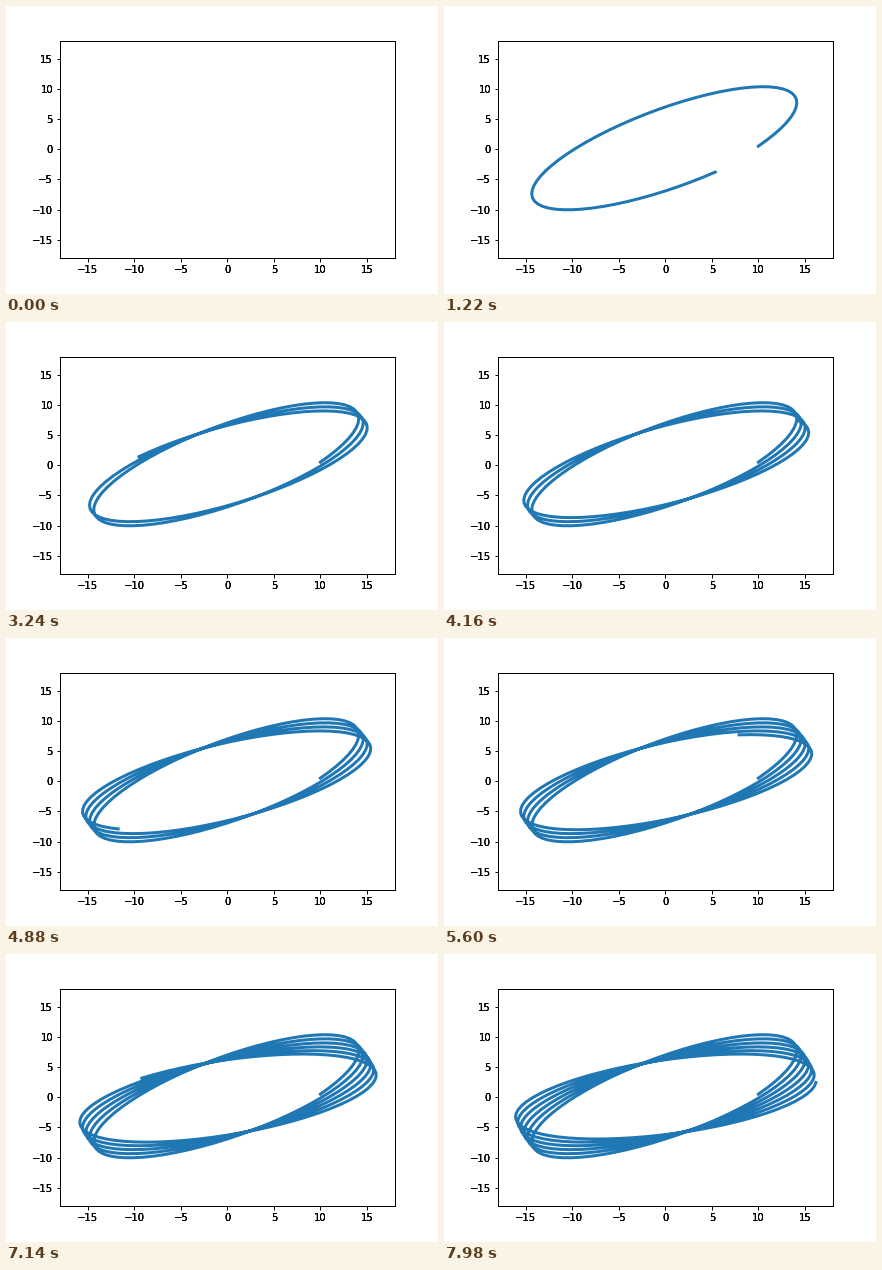
Write a matplotlib script that moves like this. It is 432 px wide and 288 px high and loops after 8000 ms.

```python
import numpy as np
import matplotlib.pyplot as plt
from matplotlib.animation import FuncAnimation

FRAMES = 400
INTERVAL = 20
LIMIT = 18
TICKS = range(-15, 16, 5)

# Precessing ellipse: semi-axes, tilt and phase (degrees per step)
MAJOR, MINOR = 16.49, 6.06
TILT, TILT_RATE = 34.14, -0.0572
PHASE, PHASE_RATE = -58.7, 5.542

plt.rcParams.update({
    "font.family": "DejaVu Sans",
    "font.size": 10,
    "axes.linewidth": 1,
    "xtick.major.width": 1,
    "ytick.major.width": 1,
})


def pendulum_path(n):
    step = np.arange(n)
    tilt = np.radians(TILT + TILT_RATE * step)
    phase = np.radians(PHASE + PHASE_RATE * step)
    z = (MAJOR * np.cos(phase) + 1j * MINOR * np.sin(phase)) * np.exp(1j * tilt)
    return z.real, z.imag


def darken_labels(ax, passes=2):
    """Redraw the tick labels in place so their edges turn solid."""
    for v in TICKS:
        label = str(v).replace("-", "\u2212")
        for _ in range(passes):
            ax.annotate(label, (v, 0), xycoords=("data", "axes fraction"),
                        xytext=(0, -7), textcoords="offset points",
                        ha="center", va="top", annotation_clip=False)
            ax.annotate(label, (0, v), xycoords=("axes fraction", "data"),
                        xytext=(-7, 0), textcoords="offset points",
                        ha="right", va="center_baseline",
                        annotation_clip=False)


fig, ax = plt.subplots(figsize=(6, 4), dpi=72, facecolor="white")
fig.subplots_adjust(left=0.125, right=0.9, bottom=0.125, top=0.88)
ax.set(xlim=(-LIMIT, LIMIT), ylim=(-LIMIT, LIMIT), xticks=TICKS, yticks=TICKS)
darken_labels(ax)

xs, ys = pendulum_path(FRAMES)
line, = ax.plot([], [], color="#1f77b4", lw=3)


def init():
    line.set_data([], [])
    return line,


def update(i):
    end = i + 1 if i else 0
    line.set_data(xs[:end], ys[:end])
    return line,


anim = FuncAnimation(fig, update, frames=FRAMES, init_func=init,
                     interval=INTERVAL, repeat=True, repeat_delay=0)
plt.show()
```
